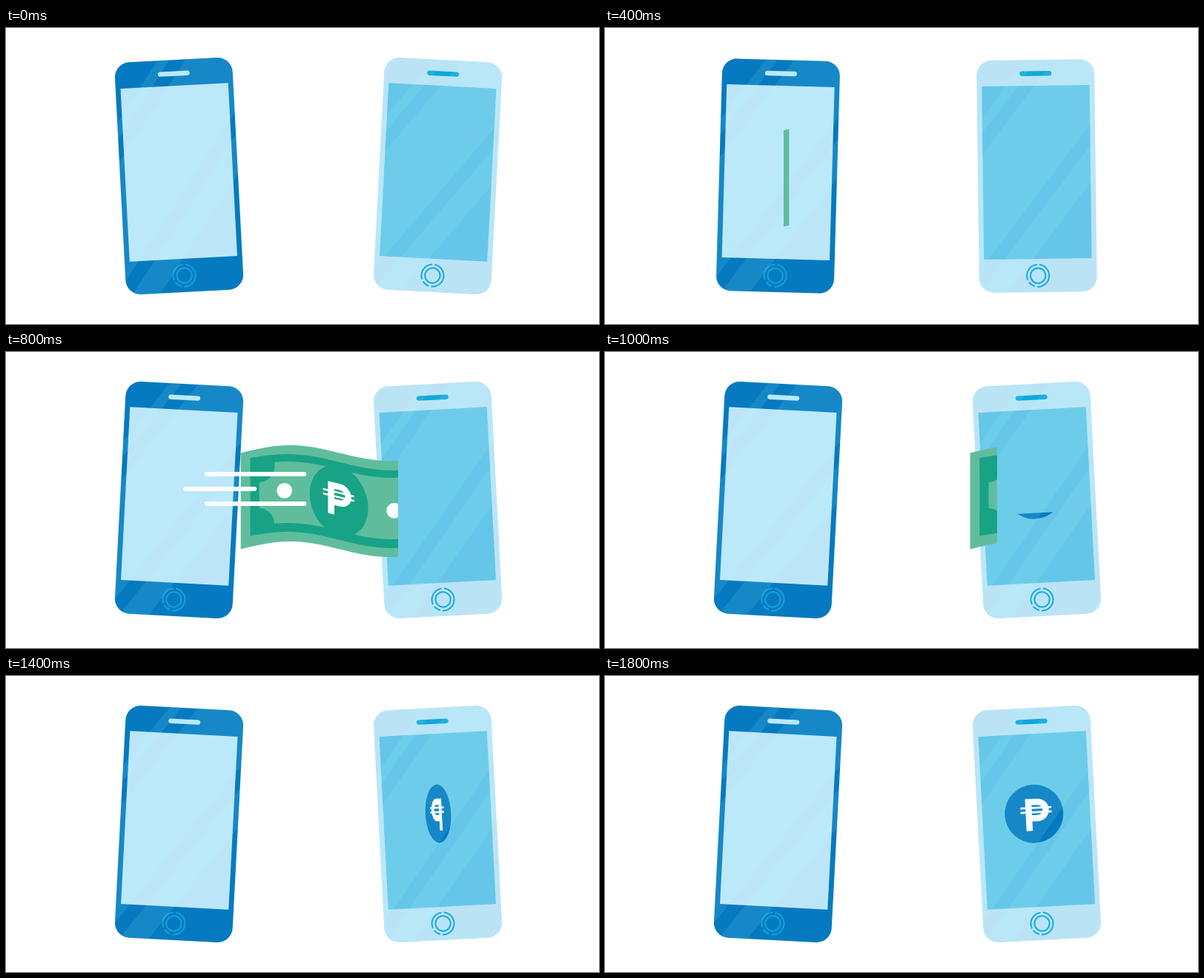
These frames come from a looping animation (800 by 400 pixels, 2400 ms). An HTML page with a canvas:

```html
<!DOCTYPE html>
<html lang="en">
<head>
<meta charset="utf-8">
<title>Mobile money transfer</title>
<style>
html, body { margin: 0; height: 100%; overflow: hidden; background: #fff; }
canvas { display: block; }
</style>
</head>
<body>
<canvas id="stage" width="800" height="400"></canvas>
<script>
const ctx = document.getElementById('stage').getContext('2d');
const LOOP = 2400, STEP = 100, TAU = Math.PI * 2;

const BLUE = '#067ac0', LIGHT_GREEN = '#5fbd9d', DARK_GREEN = '#18a386';
const NOTE_WIDTH = 267;
const SENDER = { x: 233.5, body: BLUE, screen: '#bce6f8', speaker: '#bce6f8', button: '#12a3dc', lean: 0.72 };
const RECEIVER = { x: 582.5, body: '#bae4f6', screen: '#66c6e9', speaker: '#0fa7dc', button: '#16aae0', lean: 0.77 };
const SHINE = [[-134, -118], [-96, 20], [42, 80]];
const PESO = new Path2D('M-7 23V-16H5a11 11 0 0 1 0 22H-7');
const PESO_BARS = new Path2D('M-18-8H24M-18-2H24');

const clamp = p => Math.min(1, Math.max(0, p));
const ease = p => (1 - Math.cos(Math.PI * clamp(p))) / 2;
const radians = degrees => degrees * TAU / 360;

function group(draw) {
  ctx.save();
  draw();
  ctx.restore();
}

function clipRect(x, y, w, h) {
  ctx.beginPath();
  ctx.rect(x, y, w, h);
  ctx.clip();
}

function ellipse(x, y, rx, ry, color) {
  ctx.fillStyle = color;
  ctx.beginPath();
  ctx.ellipse(x, y, rx, ry, 0, 0, TAU);
  ctx.fill();
}

function roundRect(x, y, w, h, r, color) {
  ctx.fillStyle = color;
  ctx.beginPath();
  ctx.roundRect(x, y, w, h, r);
  ctx.fill();
}

function peso() {
  ctx.strokeStyle = '#fff';
  ctx.lineWidth = 8.5;
  ctx.stroke(PESO);
  ctx.lineWidth = 2.6;
  ctx.stroke(PESO_BARS);
}

function homeButton(color) {
  const arc = (r, from, to) => {
    ctx.beginPath();
    ctx.arc(0, 134.7, r, radians(from), radians(to));
    ctx.stroke();
  };
  ctx.strokeStyle = color;
  ctx.lineWidth = 2;
  arc(10.2, 0, 360);
  arc(15, -82, 95);
  arc(15, 107, 145);
  arc(15, 157, 266);
}

function shine(lean) {
  const shift = lean * 160;
  ctx.beginPath();
  ctx.roundRect(-79.5, -157, 159, 314, 20);
  ctx.clip();
  ctx.fillStyle = 'rgba(175,255,255,.1)';
  for (const [a, b] of SHINE) {
    ctx.beginPath();
    ctx.moveTo(a + shift, -160);
    ctx.lineTo(b + shift, -160);
    ctx.lineTo(b - shift, 160);
    ctx.lineTo(a - shift, 160);
    ctx.fill();
  }
}

function phone(style, degrees, drawContent) {
  group(() => {
    ctx.translate(style.x, 200);
    ctx.rotate(radians(degrees));
    roundRect(-79.5, -157, 159, 314, 20, style.body);
    ctx.fillStyle = style.screen;
    ctx.fillRect(-72.7, -122, 145.4, 234);
    roundRect(-21.5, -141.7, 43, 6.4, 3.2, style.speaker);
    homeButton(style.button);
    if (drawContent) group(drawContent);
    shine(style.lean);
  });
}

// The coin is wiped in from below, then turns once about the phone's long axis.
function coin(t) {
  const reveal = clamp((t - 900) / 300) ** 2;
  clipRect(-73, 27 - 86 * reveal, 146, 200);
  ctx.scale(Math.cos(TAU * clamp((t - 1210) / 590)), 1);
  ctx.translate(-3, -14);
  ellipse(0, 0, 39.5, 39.5, BLUE);
  peso();
}

const wave = x => 136.5 - 10.5 * Math.sin(TAU * x / NOTE_WIDTH);
const border = x => wave(x) + 12.5 + 2.5 * ((x - NOTE_WIDTH / 2) / 120) ** 3;
const panel = x => border(x) + 10;

// A strip of the note whose lower edge repeats its upper edge.
function wavyPath(margin, top, height) {
  const end = NOTE_WIDTH - margin;
  ctx.beginPath();
  for (let x = margin; x <= end; x++) ctx.lineTo(x, top(x));
  for (let x = end; x >= margin; x--) ctx.lineTo(x, top(x) + height);
}

function wavyFill(margin, top, height, color) {
  wavyPath(margin, top, height);
  ctx.fillStyle = color;
  ctx.fill();
}

function banknote(left) {
  clipRect(241, 100, 288, 200);
  ctx.translate(left, 0);
  wavyFill(0, wave, 130, LIGHT_GREEN);
  wavyFill(13, border, 105, DARK_GREEN);
  wavyFill(25, panel, 83, LIGHT_GREEN);

  group(() => {
    wavyPath(13, border, 105);
    ctx.clip();
    for (const [x, y] of [[25, 152], [NOTE_WIDTH - 25, 171]]) {
      ellipse(x, y, 21, 24, DARK_GREEN);
      ellipse(x, y + 83, 21, 24, DARK_GREEN);
    }
  });

  ellipse(59, 187.3, 10.4, 10.4, '#fff');
  ellipse(NOTE_WIDTH - 60, 214.3, 10.4, 10.4, '#fff');
  ctx.translate(NOTE_WIDTH / 2, 201.5);
  ctx.transform(1, 0.247, 0, 1, 0, 0);
  ellipse(-1, 0, 39.5, 47, DARK_GREEN);
  ctx.translate(-4.5, -3);
  peso();
}

// The head runs ahead evenly; the tail catches up with growing speed.
function speedLine(from, to, y, age) {
  const head = from + (to - from) * clamp(age / 370);
  const tail = from + (to - from) * clamp((age - 162) / 278) ** 2;
  if (head - tail > 6) roundRect(tail, y - 3, head - tail, 6, 3, '#fff');
}

function draw(t) {
  ctx.fillStyle = '#fff';
  ctx.fillRect(0, 0, 800, 400);
  phone(SENDER, -3 + 6 * ease((t - 100) / 440));
  phone(RECEIVER, 3 - 6 * ease((t - 140) / 450), () => coin(t));
  group(() => banknote(-58 + 650 * ease((t - 238) / 1024)));
  speedLine(249, 490, 165, t - 560);
  speedLine(237, 434, 185, t - 610);
  speedLine(249, 490, 205, t - 560);
}

function tick() {
  const t = performance.now() % LOOP;
  draw(Math.floor(t / STEP) * STEP);
  requestAnimationFrame(tick);
}
tick();
</script>
</body>
</html>
```
